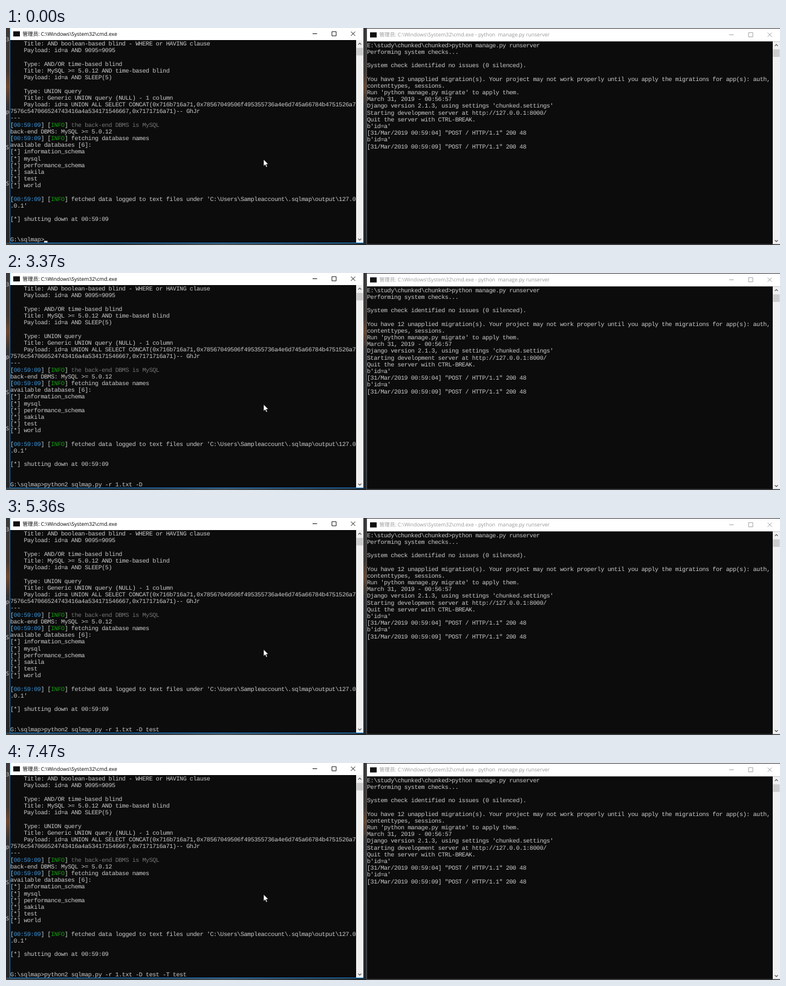
An HTML page that plays this animation: 1280 px wide and 360 px high, repeating every 8000 ms.

```html
<!DOCTYPE html>
<html lang="en">
<head>
<meta charset="utf-8">
<title>Two consoles</title>
<style>
  html, body { margin: 0; width: 100%; height: 100%; overflow: hidden; background: #23262b; }
  svg { display: block; }
  text { white-space: pre; text-rendering: geometricPrecision; }
  .mono { font: 10px "Liberation Mono", monospace; letter-spacing: -.4px; fill: #ccc; }
  .title { font: 8.6px "Open Sans", "Noto Sans CJK SC", "Noto Sans CJK", sans-serif; }
  .label { font: 9px "Open Sans", sans-serif; fill: #ddd; }
  .time { fill: #3a96dd; }
  .info { fill: #13a10e; }
  .dim { fill: #767676; }
</style>
</head>
<body>
<svg width="1280" height="360" viewBox="0 0 1280 360">
  <defs>
    <linearGradient id="side" x2="0" y2="1">
      <stop offset="0" stop-color="#38393d"/>
      <stop offset=".2" stop-color="#403a37"/>
      <stop offset=".27" stop-color="#694733"/>
      <stop offset=".36" stop-color="#303338"/>
      <stop offset="1" stop-color="#20262c"/>
    </linearGradient>
    <linearGradient id="base">
      <stop offset="0" stop-color="#3b444a"/>
      <stop offset=".3" stop-color="#252d33"/>
      <stop offset=".6" stop-color="#45525a"/>
      <stop offset="1" stop-color="#20272d"/>
    </linearGradient>
  </defs>

  <rect width="1280" height="360" fill="url(#side)"/>
  <rect y="356" width="597" height="4" fill="url(#base)"/>
  <g class="label">
    <text x="0" y="22">3</text>
    <text x="0" y="142">p</text>
    <text x="0" y="201">S</text>
    <text x="0" y="261">S</text>
  </g>

  <g id="windows"></g>

  <text id="prompt" class="mono" x="7" y="353.9"></text>
  <rect id="caret" y="353.2" width="5.6" height="2.6" fill="#e4e4e4"/>
  <path d="M426 218v11.2l2.6-2.4 1.8 4.2 1.8-.8-1.8-4.1h3.5z" fill="#fff" stroke="#000" stroke-width=".6"/>
</svg>

<script>
const CELL = 5.6, LINE = 11.2, LOOP = 8000;
const windows = document.getElementById("windows");
const prompt = document.getElementById("prompt");
const caret = document.getElementById("caret");

const info = (message, style = "") =>
  `[<tspan class="time">00:59:09</tspan>] [<tspan class="info">INFO</tspan>] <tspan class="${style}">${message}</tspan>`;

const sqlmapOutput = String.raw`    Title: AND boolean-based blind - WHERE or HAVING clause
    Payload: id=a AND 9095=9095

    Type: AND/OR time-based blind
    Title: MySQL >= 5.0.12 AND time-based blind
    Payload: id=a AND SLEEP(5)

    Type: UNION query
    Title: Generic UNION query (NULL) - 1 column
    Payload: id=a UNION ALL SELECT CONCAT(0x716b716a71,0x78567049506f495355736a4e6d745a66784b4751526a7
7576c547066524743416a4a534171546667,0x7171716a71)-- GhJr
---
${info("the back-end DBMS is MySQL", "dim")}
back-end DBMS: MySQL >= 5.0.12
${info("fetching database names")}
available databases [6]:
[*] information_schema
[*] mysql
[*] performance_schema
[*] sakila
[*] test
[*] world

${info(String.raw`fetched data logged to text files under 'C:\Users\Sampleaccount\.sqlmap\output\127.0`)}
.0.1'

[*] shutting down at 00:59:09`;

const serverOutput = String.raw`E:\study\chunked\chunked>python manage.py runserver
Performing system checks...

System check identified no issues (0 silenced).

You have 12 unapplied migration(s). Your project may not work properly until you apply the migrations for app(s): auth,
contenttypes, sessions.
Run 'python manage.py migrate' to apply them.
March 31, 2019 - 00:56:57
Django version 2.1.3, using settings 'chunked.settings'
Starting development server at http://127.0.0.1:8000/
Quit the server with CTRL-BREAK.
b'id=a'
[31/Mar/2019 00:59:04] "POST / HTTP/1.1" 200 48
b'id=a'
[31/Mar/2019 00:59:09] "POST / HTTP/1.1" 200 48`;

const rect = (x, y, w, h, fill) =>
  `<rect x="${x}" y="${y}" width="${w}" height="${h}" fill="${fill}"/>`;

function drawWindow({ left, right, top, body, bottom, edge, ink, title, output }) {
  const bar = right - 12, mid = (top + body) / 2 - .5;
  const arrow = (y, dir) =>
    `<path d="M${bar + 3.5} ${y + dir}l2.5 ${-2.5 * dir} 2.5 ${2.5 * dir}" fill="none" stroke="#555" stroke-width="1.1"/>`;
  const rows = output.split("\n").map((line, i) =>
    `<text class="mono" x="${left + 1}" y="${body + i * LINE + 9.1}">${line}</text>`);
  windows.innerHTML +=
    rect(left, top, right - left, bottom - top, edge) +
    rect(left + 1, top, right - left - 1, body - top, "#fff") +
    rect(left + 1, body, bar - left - 1, bottom - body - 1, "#0c0c0c") +
    rect(bar, body, 12, bottom - body - 1, "#f0f0f0") +
    rect(bar + .5, body + 13, 11, 12.5, "#cdcdcd") +
    arrow(body + 6.5, 1) + arrow(bottom - 6.5, -1) +
    rect(left + 6, mid - 4, 11, 8.5, "#111") +
    `<text class="title" x="${left + 21.5}" y="${mid + 3}" fill="${ink}">${title}</text>` +
    `<path d="M${right - 84} ${mid}h7.5M${right - 52} ${mid - 3.5}h7v7h-7zM${right - 20.5} ${mid - 3.5}l7 7m0-7l-7 7"
      fill="none" stroke="${ink}" stroke-width=".9"/>` +
    rows.join("");
}

drawWindow({
  left: 6, right: 591, top: 0, body: 20, bottom: 357, edge: "#1883d7", ink: "#000",
  title: String.raw`管理员: C:\Windows\System32\cmd.exe`, output: sqlmapOutput
});
drawWindow({
  left: 596, right: 1280, top: 1, body: 22.4, bottom: 359.5, edge: "#555", ink: "#999",
  title: String.raw`管理员: C:\Windows\System32\cmd.exe - python  manage.py runserver`, output: serverOutput
});

// Each step: start time, command characters typed, caret shown, mistyped tail
const path = String.raw`G:\sqlmap>`;
const command = "python2 sqlmap.py -r 1.txt -D test -T test";
const steps = [
  [0, 0, 1], [280, 26, 1], [710, 26, 0], [1260, 26, 1], [1510, 27, 1], [1790, 27, 0],
  [1940, 28, 1], [2250, 29, 0], [2810, 30, 1], [3370, 30, 0], [3770, 31, 1], [3920, 31, 0],
  [4070, 32, 1], [4190, 33, 1], [4470, 34, 1], [4930, 34, 0], [5080, 35, 1], [5360, 35, 0],
  [5480, 36, 1], [5630, 37, 1], [6000, 38, 1], [6280, 39, 1, "s"], [6560, 39, 0, "s"],
  [6810, 39, 1, "s"], [6930, 39, 1], [7050, 40, 1], [7170, 41, 1], [7320, 42, 1], [7470, 42, 0]
];

function render(now) {
  const time = now % LOOP;
  const [, typed, shown, typo = ""] = steps.findLast(step => step[0] <= time);
  const line = path + command.slice(0, typed) + typo;
  if (prompt.textContent !== line) prompt.textContent = line;
  caret.setAttribute("x", 7 + line.length * CELL);
  caret.setAttribute("opacity", shown);
}

const start = performance.now();
function tick() {
  render(performance.now() - start);
  requestAnimationFrame(tick);
}
tick();
</script>
</body>
</html>
```
